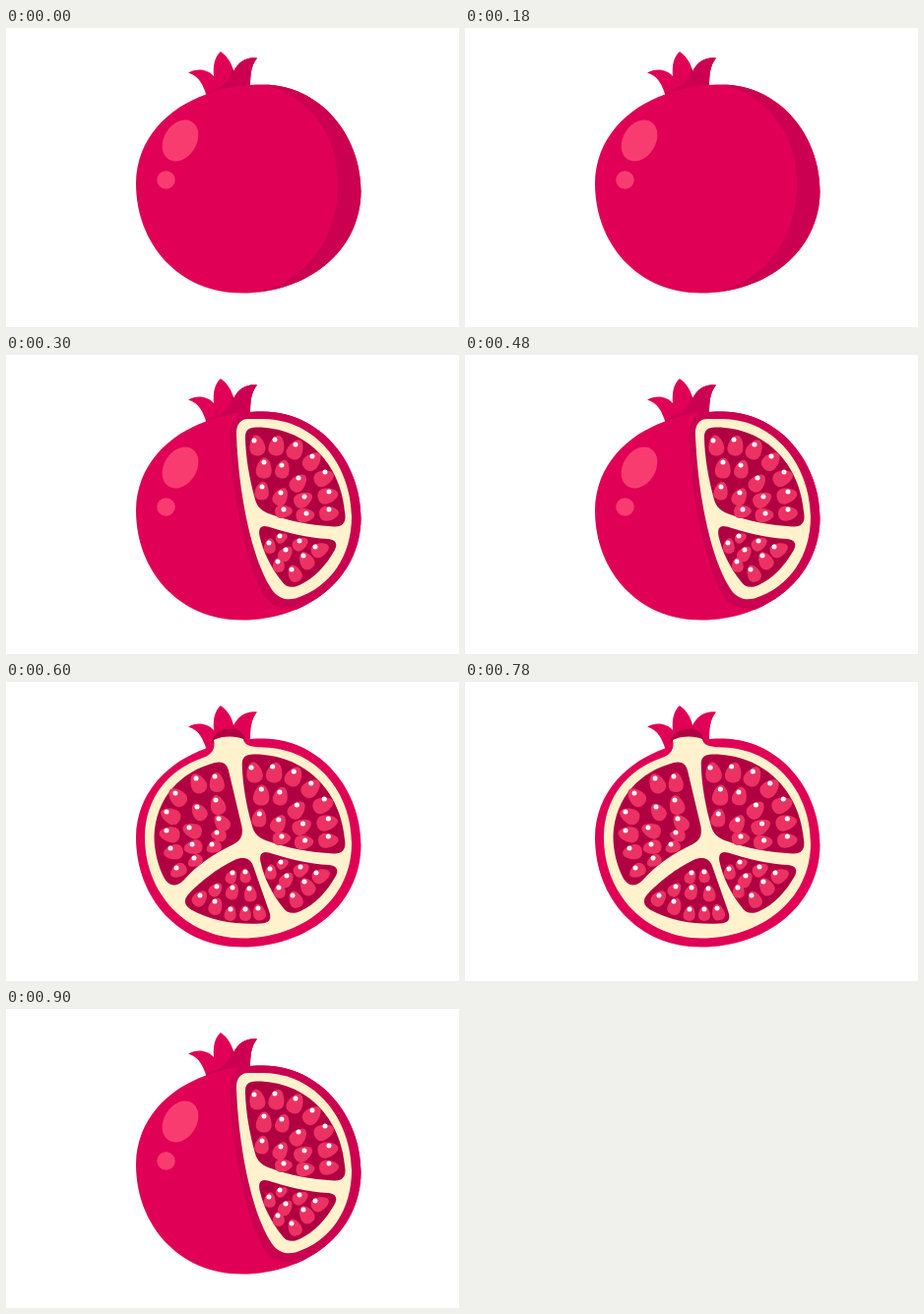
An HTML page without scripts that plays this animation: 460 px wide and 304 px high, repeating every 1.2 s.

```html
<!DOCTYPE html>
<html lang="en">
<head>
<meta charset="utf-8">
<title>Pomegranate</title>
<style>
html, body { margin: 0; width: 100%; height: 100%; overflow: hidden; background: #fff; }
svg { display: block; width: 460px; height: 304px; }
.skin { fill: #e00055; }
.shade { fill: #cb0050; }
.shine { fill: #f83c70; }
.rind { fill: #fff2cc; }
.pulp { fill: #b00042; }
.seeds { fill: #eb3263; }
.dots { fill: none; stroke: #fff; stroke-width: 5; stroke-linecap: round; }
.whole, .cut, .half { visibility: hidden; animation: whole 1.2s step-end infinite; }
.cut { animation-name: cut; }
.half { animation-name: half; }
@keyframes whole { 0% { visibility: visible; } 25%, 100% { visibility: hidden; } }
@keyframes cut { 0%, 50% { visibility: hidden; } 25%, 75%, 100% { visibility: visible; } }
@keyframes half { 0%, 75%, 100% { visibility: hidden; } 50% { visibility: visible; } }
</style>
</head>
<body>
<svg viewBox="0 0 460 304">
  <defs>
    <path id="body" d="M203 67.500C222 60 242 57.500 262 57.500C318 58 360.500 108 360.500 166C360 228 305 269.500 240 269.500C175 269.500 132 219 132 158C132.500 112 165 81 203 67.500Z"/>
    <path id="crown" d="M204 70C200 57 196 49 185 45.500C194 40.500 205 42 211 49C210 38 212 29 218 24C225 29 229.500 36 231 44C236 34 245 29 255 30.500C249 38 248 47 248 61Z"/>
    <path id="seed" d="M0-10.500C4.500-10.500 8-2 8 3C8 8 4.500 10.500 0 10.500C-4.500 10.500-8 8-8 3C-8-2-4.500-10.500 0-10.500Z"/>
    <clipPath id="bodyClip"><use href="#body"/></clipPath>
    <clipPath id="crownClip"><use href="#crown"/></clipPath>

    <g id="shell">
      <use href="#crown" class="skin"/>
      <path class="shade" clip-path="url(#crownClip)" d="M202 66C214 63 225 57 229 47L232 28H260V72H204Z"/>
      <use href="#body" class="skin"/>
    </g>
    <g id="gloss" class="shine">
      <ellipse cx="177" cy="114.500" rx="16.500" ry="22.500" transform="rotate(32 177 114.500)"/>
      <circle cx="162.500" cy="154.500" r="9.300"/>
    </g>

    <g id="upper">
      <path class="pulp" d="M254 73.500C303 73 341 109 344.500 163C345 171 341 175 333 174.500C310 173 287 169 266 161C259 158 255 154 253 147C247 125 243.500 104 243 85C242.500 77 246 73.500 254 73.500Z"/>
      <g class="seeds">
        <use href="#seed" transform="translate(255 92) rotate(-8)"/>
        <use href="#seed" transform="translate(275 92) rotate(12)"/>
        <use href="#seed" transform="translate(294 96) rotate(28)"/>
        <use href="#seed" transform="translate(311 108) rotate(45)"/>
        <use href="#seed" transform="translate(262 115) rotate(5)"/>
        <use href="#seed" transform="translate(281 116) rotate(15) scale(.9)"/>
        <use href="#seed" transform="translate(297 130) rotate(42) scale(.95)"/>
        <use href="#seed" transform="translate(323 125) rotate(68)"/>
        <use href="#seed" transform="translate(260 138) rotate(10) scale(.9)"/>
        <use href="#seed" transform="translate(279 144) rotate(30) scale(.9)"/>
        <use href="#seed" transform="translate(302 147) rotate(60) scale(.95)"/>
        <use href="#seed" transform="translate(327 143) rotate(78)"/>
        <use href="#seed" transform="translate(282 159) rotate(85) scale(.85)"/>
        <use href="#seed" transform="translate(304 163) rotate(85) scale(.9)"/>
        <use href="#seed" transform="translate(328 161) rotate(85) scale(.95)"/>
      </g>
      <path class="dots" d="M252 87h0M273 86h0M294 91h0M311 103h0M262 109h0M280 112h0M297 125h0M324 119h0M260 134h0M279 140h0M303 144h0M328 139h0M282 157h0M305 161h0M328 157h0"/>
    </g>

    <g id="lower">
      <path class="pulp" d="M266 174.500C286 181 306 186 327 187C335 188 337 192 334 198C325 214 313 227 298 234C290 237.500 284 236 280 230C269 216 261 200 257.500 184C256 176 259 172.500 266 174.500Z"/>
      <g class="seeds">
        <use href="#seed" transform="translate(268 194) rotate(5) scale(.75)"/>
        <use href="#seed" transform="translate(280 186) rotate(60) scale(.6)"/>
        <use href="#seed" transform="translate(299 192) rotate(60) scale(.8)"/>
        <use href="#seed" transform="translate(284 202) rotate(40) scale(.8)"/>
        <use href="#seed" transform="translate(319 198) rotate(65) scale(.9)"/>
        <use href="#seed" transform="translate(305 209) rotate(-30) scale(.9)"/>
        <use href="#seed" transform="translate(277 213) rotate(5) scale(.75)"/>
        <use href="#seed" transform="translate(293 222) rotate(-25) scale(.85)"/>
      </g>
      <path class="dots" d="M267 191h0M278 184h0M298 189h0M284 198h0M314 195h0M302 204h0M276 210h0M290 218h0"/>
    </g>
  </defs>

  <g class="whole">
    <use href="#shell"/>
    <path class="shade" clip-path="url(#bodyClip)" d="M258 56C308 68 337 108 337 158C337 214 306 256 256 268L370 280V50Z"/>
    <use href="#gloss"/>
  </g>

  <g class="cut">
    <use href="#shell"/>
    <path class="shade" clip-path="url(#bodyClip)" d="M248 56C234 59 227 67 227.500 82C229 138 242 202 258 238C264 251 274 258 287 257L302 262L370 260V50Z"/>
    <path class="rind" d="M246 65C238 65 233.500 71 234 81C236 136 248 204 269 237C275 247 284 250 294 247.500C330 236 351 204 351 164C350 112 315 66 262 65Z"/>
    <use href="#upper"/>
    <use href="#lower"/>
    <use href="#gloss"/>
  </g>

  <g class="half">
    <use href="#crown" class="skin"/>
    <use href="#body" class="skin"/>
    <path class="pulp" d="M208 62C211 51 220 47 230 47.500C238 48 242 53 243 61Z"/>
    <path class="rind" d="M211 59C219 54.500 234 54.500 241 58C242 65 250 66 262 66.500C315 68 351 112 351 164C351 222 300 260.500 240 260.500C183 260 141 215 141 158C141 118 165 89 200 77C209 74 213 68 211 59Z"/>
    <use href="#upper" transform="translate(-10.500 0) scale(1.030 1)"/>
    <use href="#lower" x="1" y="-1"/>

    <path class="pulp" d="M212 82C221 80 225 84 226.500 92L239.500 147C241 157 238 161 231 165C211 175 195 185 181 201C173 209 166 208 161 200C154 187 150.500 171 150.500 157C152 117 178 91 212 82Z"/>
    <g class="seeds">
      <use href="#seed" transform="translate(195 103) rotate(-25)"/>
      <use href="#seed" transform="translate(214 102) rotate(-5) scale(.95)"/>
      <use href="#seed" transform="translate(174 117) rotate(-45)"/>
      <use href="#seed" transform="translate(167 136) rotate(-65)"/>
      <use href="#seed" transform="translate(196 132) rotate(-35) scale(.9)"/>
      <use href="#seed" transform="translate(215 125) rotate(-15) scale(.95)"/>
      <use href="#seed" transform="translate(166 155) rotate(-82)"/>
      <use href="#seed" transform="translate(189 151) rotate(-70) scale(.95)"/>
      <use href="#seed" transform="translate(219 143) rotate(-40) scale(.9)"/>
      <use href="#seed" transform="translate(170 173) rotate(-98) scale(.95)"/>
      <use href="#seed" transform="translate(190 168) rotate(-100) scale(.9)"/>
      <use href="#seed" transform="translate(216 156) rotate(-80) scale(.75)"/>
      <use href="#seed" transform="translate(175 192) rotate(-125) scale(.85)"/>
      <use href="#seed" transform="translate(192 182) rotate(-120) scale(.75)"/>
      <use href="#seed" transform="translate(211 168) rotate(-115) scale(.75)"/>
    </g>
    <path class="dots" d="M193 98h0M212 96h0M172 113h0M163 132h0M194 127h0M213 120h0M163 151h0M186 148h0M216 139h0M167 169h0M189 165h0M214 153h0M173 189h0M191 179h0M209 165h0"/>

    <path class="pulp" d="M232 181C241 177 248 179 251 187L267.500 234C270 242 267 245 259 245.500C234 247 209 243 188 231.500C181 227 180 222 185 216C198 202 214 190 232 181Z"/>
    <g class="seeds">
      <use href="#seed" transform="translate(229 198) rotate(25) scale(.7)"/>
      <use href="#seed" transform="translate(243 197) rotate(-5) scale(.7)"/>
      <use href="#seed" transform="translate(213 211) rotate(40) scale(.75)"/>
      <use href="#seed" transform="translate(230 213) rotate(20) scale(.8)"/>
      <use href="#seed" transform="translate(248 215) rotate(-5) scale(.8)"/>
      <use href="#seed" transform="translate(197 220) rotate(40) scale(.85)"/>
      <use href="#seed" transform="translate(213 228) rotate(20) scale(.85)"/>
      <use href="#seed" transform="translate(228 235) rotate(10) scale(.75)"/>
      <use href="#seed" transform="translate(243 235) scale(.75)"/>
      <use href="#seed" transform="translate(257 234) rotate(-15) scale(.8)"/>
    </g>
    <path class="dots" d="M230 194h0M243 193h0M214 208h0M230 209h0M247 210h0M197 217h0M212 223h0M228 231h0M243 231h0M256 230h0"/>
  </g>
</svg>
</body>
</html>
```
